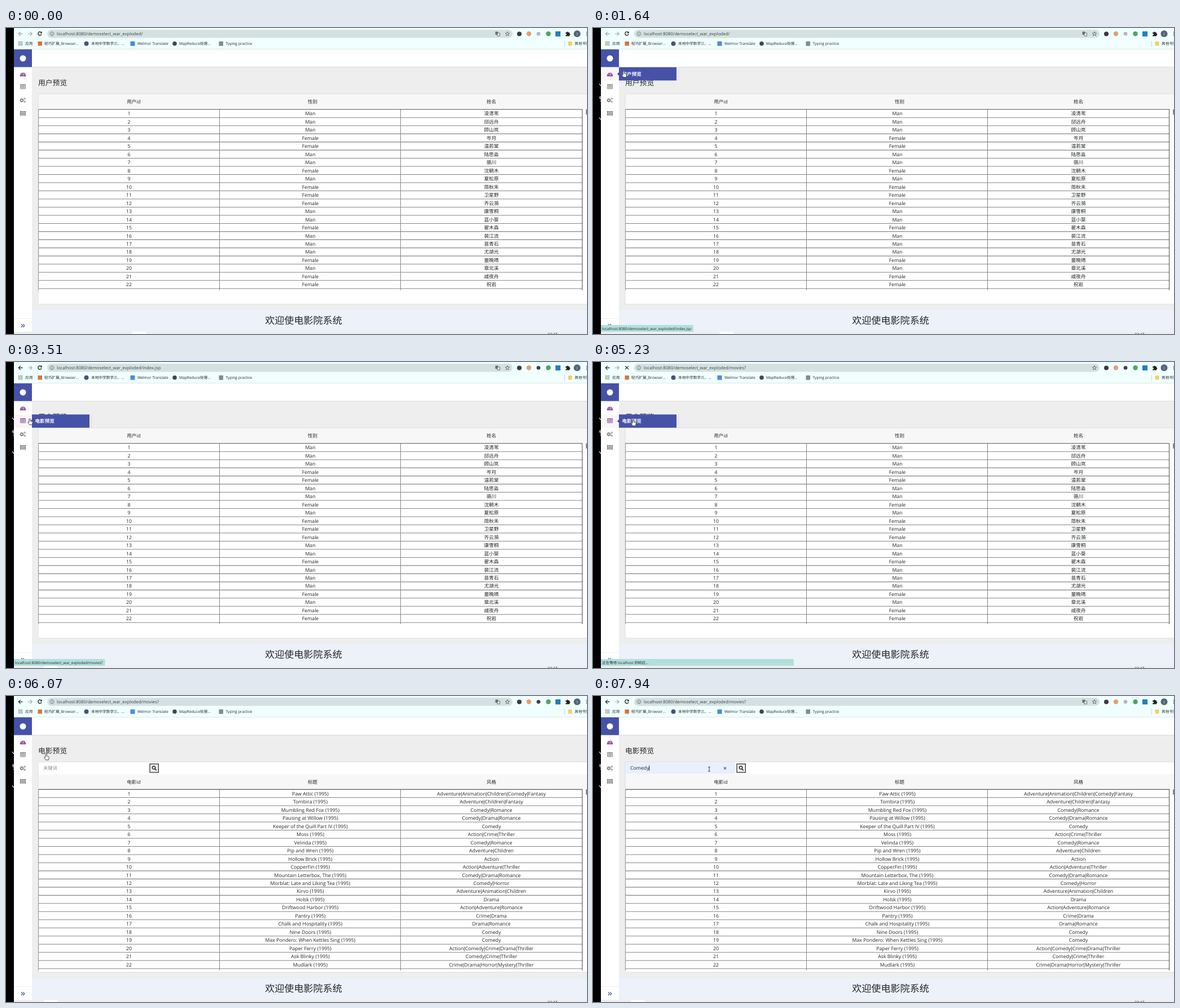
Recreate the animation shown at these times as an HTML page. Size 1030 by 544 pixels, loop 8000 ms.

```html
<!DOCTYPE html>
<html>
<head>
<meta charset="utf-8">
<title>Cinema admin</title>
<style>
html, body { margin: 0; width: 100%; height: 100%; overflow: hidden; background: #000; }
svg { display: block; width: 1030px; height: 544px; }
text { font-family: "Open Sans", "Noto Sans", "Noto Sans CJK SC", sans-serif; fill: #24272b; white-space: pre; text-rendering: geometricPrecision; }
.bar { font-family: "Liberation Sans", sans-serif; }
</style>
</head>
<body>
<svg id="stage" viewBox="0 0 1030 544" xmlns="http://www.w3.org/2000/svg"></svg>
<script>
const LOOP = 8000;
const ROW = 14.48;
const INDIGO = '#4652a8', PURPLE = '#8f4b99', GREY = '#777', RULE = '#848484';

const users = ('凌清苇 邱远舟 顾山岚 岑月 温若棠 陆思淼 骆川 沈朝木 夏松原 简秋禾 卫星野 ' +
  '齐云漪 康雪桐 蓝小葵 翟木森 裴江流 苗青石 尤湖光 童晚晴 章北溪 戚夜舟 祝岩').split(' ');
const genders = 'MMMFFMMFMFFFMMFMMMFMFF';
const movies = `Paw Attic;Adventure|Animation|Children|Comedy|Fantasy
Tombira;Adventure|Children|Fantasy
Mumbling Red Fox;Comedy|Romance
Pausing at Willow;Comedy|Drama|Romance
Keeper of the Quill Part IV;Comedy
Moss;Action|Crime|Thriller
Velinda;Comedy|Romance
Pip and Wren;Adventure|Children
Hollow Brick;Action
CopperFin;Action|Adventure|Thriller
Mountain Letterbox, The;Comedy|Drama|Romance
Morblat: Late and Liking Tea;Comedy|Horror
Kirvo;Adventure|Animation|Children
Holsk;Drama
Driftwood Harbor;Action|Adventure|Romance
Pantry;Crime|Drama
Chalk and Hospitality;Drama|Romance
Nine Doors;Comedy
Max Pondero: When Kettles Sing;Comedy
Paper Ferry;Action|Comedy|Crime|Drama|Thriller
Ask Blinky;Comedy|Crime|Thriller
Mudlark;Crime|Drama|Horror|Mystery|Thriller`.split('\n').map(l => l.split(';'));

// Markup helpers
const rect = (x, y, w, h, fill, more = '') => `<rect x="${x}" y="${y}" width="${w}" height="${h}" fill="${fill}" ${more}/>`;
const disc = (x, y, r, fill, more = '') => `<circle cx="${x}" cy="${y}" r="${r}" fill="${fill}" ${more}/>`;
const line = (d, color, w = 1) => `<path d="${d}" fill="none" stroke="${color}" stroke-width="${w}"/>`;
const group = (id, body) => `<g id="${id}">${body}</g>`;
const at = (x, y, body) => `<g transform="translate(${x} ${y})">${body}</g>`;
const text = (x, mid, s, size, more = '') =>
  `<text x="${x}" y="${mid + size * .36}" font-size="${size}" ${more}>${s}</text>`;
const center = (x, mid, s, size = 8.75) => text(x, mid, s, size, 'text-anchor="middle"');
const bars = s => s.split('|').join('<tspan class="bar">|</tspan>');

function table(top, bottom, heads, rows, clip) {
  let s = rect(57, top - 27, 973, 27, '#f7f7f7') + rect(57, top, 973, 491 - top, '#fff');
  heads.forEach((h, i) => s += center([226.5, 543.5, 860.5][i], top - 13.5, h, 8.5));
  let body = '';
  rows.forEach((r, i) => {
    const y = top + ROW * i;
    r.forEach((c, k) => body += center([218, 539.5, 860.5][k], y + 7.45, c));
    body += line(`M57 ${y + ROW}H1022`, RULE, 1.07);
  });
  body += line(`M378.5 ${top}V${bottom}M699.5 ${top}V${bottom}`, RULE);
  body += line(`M57.5 ${bottom}V${top}H1021.5V${bottom}`, '#555', 1.07);
  s += `<clipPath id="${clip}"><rect x="57" y="${top - 1}" width="966" height="${bottom - top + 1}"/></clipPath>`;
  return s + `<g clip-path="url(#${clip})">${body}</g>` + rect(1028, top, 2, 9, '#858585');
}

function gear(x, y, r, teeth) {
  const R = r * 1.45;
  return disc(x, y, r, 'none', `stroke="${GREY}" stroke-width="${r * .7}"`) +
    disc(x, y, R, 'none', `stroke="${GREY}" stroke-width="${r * .5}" stroke-dasharray="${Math.PI * R / teeth}"`);
}

function browser() {
  let s = rect(14, 0, 1016, 38, '#f0fffe') + rect(73, 3, 825, 14.5, '#d4e1e0', 'rx="7.2"');
  s += group('back', line('M29.5 10.3H22.5M25.8 6.8L22.3 10.3L25.8 13.8', 'currentColor', 1.2));
  s += line('M39 10.3H46M42.7 6.8L46.2 10.3L42.7 13.8', '#9aa3a3', 1.1);
  s += group('reload', line('M62.6 8A3.2 3.2 0 1 0 63 11', '#222', 1.3) + '<path d="M63.7 6v3.4h-3.4z" fill="#222"/>');
  s += group('stop', line('M57 7.2L63 13.2M63 7.2L57 13.2', '#222', 1.2));
  s += line('M81.5 6.8a3.4 3.4 0 1 0 .01 0zM81.5 9.7V12.3M81.5 8.2V9', '#4d5656', .8);
  s += text(90, 10.3, '', 7.7, 'id="url" style="fill:#3c4444"');
  s += group('lang', rect(867.5, 6.5, 5, 5.5, '#67706f') + rect(871, 9, 4.5, 5, '#e6efee', 'stroke="#555" stroke-width=".8"'));
  s += line('M889 6.4L890 9.1L892.8 9.2L890.6 11L891.4 13.7L889 12.1L886.6 13.7L887.4 11L885.2 9.2L888 9.1Z', '#4d5656', .8);
  s += disc(910, 10.5, 4, '#3a3a44') + disc(927, 10.3, 4.2, '#e2a070');
  s += '<circle id="ext" cx="944" cy="10.3" r="3.4"/>' + disc(961.5, 10.3, 4.2, '#4aa564') + rect(974, 6, 9, 9, '#1f7fc4');
  s += '<path d="M992 8h2a1.5 1.5 0 1 1 3 0h2v2.2a1.4 1.4 0 1 1 0 2.8v1.5h-7v-2a1.4 1.4 0 1 0 0-2.6z" fill="#222"/>';
  s += disc(1012.5, 10.3, 6, '#566477') + text(1012.5, 10.3, 'I', 6.5, 'text-anchor="middle" style="fill:#fff"');
  s += disc(1029.6, 7.5, .8, '#333') + disc(1029.6, 10.3, .8, '#333') + disc(1029.6, 13.1, .8, '#333');
  for (let i = 0; i < 9; i++)
    s += rect(22 + i % 3 * 2.7, 24 + Math.floor(i / 3) * 2.7, 1.7, 1.7, ['#d9534a', '#4c9a52', '#4a7fd4'][i % 3]);
  const mark = (x, t) => text(x, 27.8, t, 6.7);
  s += mark(34, '应用') + rect(56.5, 24, 7.5, 7.5, '#d8743f') + mark(68, '轻巧扩展_Browser...');
  s += disc(142.5, 27.7, 4, '#4d5077') + mark(151, '本地中学数学三、...');
  s += rect(220.5, 23.8, 8, 8, '#4a8be0') + mark(233, 'Welmor Translate');
  s += disc(299, 27.7, 3.8, '#45454b') + mark(307, 'MapReduce处理...');
  s += rect(377.5, 23.8, 7.5, 8, '#86898c') + mark(389.5, 'Typing practice');
  s += line('M990.5 23V33', '#c9d4d4') + rect(996.5, 24, 7, 7.5, '#f3cf63', 'rx="1"') + mark(1008, '其他书签');
  return s + line('M14 37.5H1030', '#dde6e6');
}

function sidebar() {
  let s = rect(14, 38, 32, 502, '#fff') + rect(14, 38, 32, 31.5, INDIGO) + disc(30, 54, 5.5, '#fff');
  s += group('hot1', rect(14, 70, 32, 23.5, '#f8f5f9')) + group('hot2', rect(14, 93.5, 32, 23.5, '#f8f5f9'));
  s += at(30, 82, `<path d="M-5 4A5.2 5.2 0 1 1 5 4Z" fill="${PURPLE}"/>` +
    line('M0 3L1 -1.6M-3.6 1H-2.3M2.6 1H3.8M-2.6 -2L-1.9 -1.2M0 -3.3V-2.3', '#fff', .9));
  s += group('grid', line('M25.5 100.5H34.5V108H25.5ZM25.5 101.3H34.5M25.5 103.6H34.5M25.5 105.8H34.5M28.5 101V108M31.5 101V108', 'currentColor', .8));
  s += gear(28, 128.5, 2.1, 8) + gear(33.2, 125.6, 1.1, 6) + gear(33.2, 131, 1.1, 6);
  for (let i = 0; i < 9; i++)
    s += rect(24.8 + i % 3 * 3.7, 147.8 + Math.floor(i / 3) * 2.8, 3, 2.1, GREY);
  return s + line('M14 516.5H46', '#eee') +
    line('M27 526.4L29.6 529.2L27 532M30.2 526.4L32.8 529.2L30.2 532', '#3f4788', 1.15);
}

const title = s => text(57, 97.2, s, 12.8);
const tip = (id, y, s) => group(id, rect(148, y, 5, 23.5, '#e8e8ea') + rect(46, y, 102, 23.5, INDIGO) +
  `<path d="M46 ${y + 9}L43 ${y + 12}L46 ${y + 15}Z" fill="#3b458f"/>` +
  text(51.5, y + 11.8, s, 8.6, 'font-weight="700" style="fill:#fff"'));

function search() {
  let s = rect(57, 117.5, 973, 22, '#fff') + group('filled', rect(57, 118, 195, 20.5, '#e8f0fe'));
  s += text(66, 128.3, '关键词', 8.2, 'id="hint" style="fill:#85898d"') + text(66, 128.3, 'Comedy', 8.75, 'id="word"');
  s += group('clear', line('M232 126.4L236 130.4M236 126.4L232 130.4', '#2f62b5', 1.3));
  s += '<rect id="caret" y="123.5" width=".9" height="9.5" fill="#111"/>';
  s += rect(255, 120.8, 15.3, 15, '#efefef', 'stroke="#333" stroke-width="1.3"');
  return s + line('M262 124.7a2.7 2.7 0 1 0 .01 0zM264 129.5L266.6 132.2', '#111', 1.4);
}

function suggestions() {
  let s = rect(57.5, 140.5, 196, 105.5, '#fff', 'stroke="#c4c7ca"') + group('pick', rect(58, 146, 195, 19, '#e9eaec'));
  ['Comedy', 'Action', 'Drama', 'Crime', 'Horror'].forEach((w, i) => s += text(66, 155.5 + i * 19, w, 8));
  return s;
}

const outline = 'fill="#fff" stroke="#222" stroke-width=".8" stroke-linejoin="round"';
const stage = document.getElementById('stage');
stage.innerHTML = rect(0, 0, 1030, 544, '#000') + rect(14, 38, 1016, 506, '#eee') +
  rect(46, 38, 984, 31.5, '#fff') + line('M46 69.5H1030', '#dcdcdc') +
  rect(46, 502, 984, 38, '#edf1fa') + center(527.5, 520, '欢迎使电影院系统', 17.1) +
  rect(14, 540, 1016, 4, '#eee') + '<rect id="task" y="540" width="25" height="4" fill="#fbfbfb"/>' +
  text(960, 545, '22:47', 6.8) +
  group('users', title('用户预览') +
    table(144.7, 466, ['用户id', '性别', '姓名'], users.map((u, i) => [i + 1, genders[i] === 'M' ? 'Man' : 'Female', u]), 'c1')) +
  group('movies', title('电影预览') +
    table(166.1, 488, ['电影id', '标题', '风格'], movies.map(([m, g], i) => [i + 1, m + ' (1995)', bars(g)]), 'c2') + search()) +
  line('M1030 117H57V491H1030', '#dfdfdf') +
  group('list', suggestions()) + sidebar() + tip('tip1', 69.8, '用户预览') + tip('tip2', 93.3, '电影预览') +
  group('status', '<path id="plate" fill="#b2dfdc"/>' + text(16, 534.2, '', 6.6, 'id="note"')) +
  browser() +
  group('tick1', line('M11 99L14 103', '#fff', 1.2)) +
  group('tick2', line('M12 121L14 124M11 123L14 127M12.5 130H14', '#fff', 1.2)) +
  group('tick3', line('M11 159L14 163', '#fff', 1.2)) +
  group('pointer',
    group('arrow', `<path d="M0 0V10.4L2.4 8.2L4 11.8L5.5 11.2L3.9 7.7H7.2Z" ${outline}/>`) +
    group('hand', `<path d="M-1.1 .9Q0 -.7 1.1 .9V4.2L4.4 5Q5.5 5.4 5.3 6.8L4.3 11.2H-.4L-3.2 7.2Q-3.3 5.6 -1.9 6L-1.1 6.8Z" ${outline}/>`) +
    group('beam', line('M-1.8 -3.8H1.8M0 -3.8V3.8M-1.8 3.8H1.8', '#222', .9)));

const el = {};
stage.querySelectorAll('[id]').forEach(n => el[n.id] = n);
const show = (id, on) => el[id].setAttribute('visibility', on ? 'visible' : 'hidden');

// Pointer path: time, x, y
const path = [[240, 944, 532], [560, 420, 330], [780, 10, 159], [860, 10, 121], [1010, 10, 97], [1080, 14, 96],
  [1240, 30, 80], [1640, 54.5, 76.5], [2260, 54.5, 76.5], [2500, 65, 85], [2900, 65, 85], [3200, 33, 100.5],
  [3510, 42, 100.5], [3680, 44, 101], [3900, 44, 101], [4220, 71, 102.5], [6230, 71, 102.5], [6310, 76, 104],
  [6540, 76, 104], [6620, 150, 128], [7010, 150, 128], [7240, 198, 150], [7470, 200, 157], [7700, 200, 157], [7940, 206, 130]];

function locate(t) {
  const i = path.findIndex(p => p[0] > t);
  if (i < 0) return path[path.length - 1].slice(1);
  if (i === 0) return path[0].slice(1);
  const [a, b] = [path[i - 1], path[i]], k = (t - a[0]) / (b[0] - a[0]);
  return [a[1] + (b[1] - a[1]) * k, a[2] + (b[2] - a[2]) * k];
}

function draw(t) {
  const within = (a, b) => t >= a && t < b;
  const first = within(1160, 2400), second = within(3130, 5690);
  const base = 'localhost:8080/demoselect_war_exploded/';

  el.url.textContent = base + (t < 2170 ? '' : t < 5140 ? 'index.jsp' : 'movies?');
  el.back.setAttribute('color', t < 2170 ? '#9aa3a3' : '#222');
  const busy = within(2020, 2480) || within(4220, 5600);
  show('stop', busy);
  show('reload', !busy);
  show('lang', !within(2170, 2480) && !within(5140, 5600));
  el.ext.setAttribute('fill', within(2260, 6580) ? '#3e4145' : '#b3b9ba');

  show('hot1', first);
  show('tip1', first);
  show('hot2', second);
  show('tip2', second);
  el.grid.setAttribute('color', second ? PURPLE : GREY);
  el.task.setAttribute('x', t < 2400 ? 224 : 67);

  const waiting = within(5140, 5920), toMovies = within(3280, 5140);
  show('status', first || toMovies || waiting);
  el.note.textContent = waiting ? '正在等待 localhost 的响应...' : base + (first ? 'index.jsp' : 'movies?');
  el.plate.setAttribute('d', `M14 528H${(waiting ? 356 : first ? 178 : 175.5) - 2}q2 0 2 2V540H14Z`);

  const films = t >= 5600, filled = t >= 7240, chosen = t >= 7470;
  show('users', !films);
  el.movies.setAttribute('display', films ? 'inline' : 'none');
  show('filled', filled);
  show('word', filled);
  show('hint', !filled);
  show('clear', chosen);
  el.caret.setAttribute('x', chosen ? 99.3 : 66);
  show('caret', chosen ? t < 7970 : within(6620, 7120));
  el.list.setAttribute('display', within(6620, 7470) ? 'inline' : 'none');
  show('pick', filled && !chosen);

  show('tick3', t >= 800);
  show('tick2', t >= 900);
  show('tick1', t >= 1010);

  const kind = t < 240 ? '' : t < 1080 ? 'arrow' : t < 2400 ? 'hand' : t < 3060 ? 'arrow' :
    t < 6270 ? 'hand' : t < 7060 ? 'beam' : t < 7850 ? 'arrow' : 'beam';
  ['arrow', 'hand', 'beam'].forEach(k => show(k, k === kind));
  el.pointer.setAttribute('transform', `translate(${locate(t).join(' ')})`);
}

function tick() {
  draw(performance.now() % LOOP);
  requestAnimationFrame(tick);
}
tick();
</script>
</body>
</html>
```
